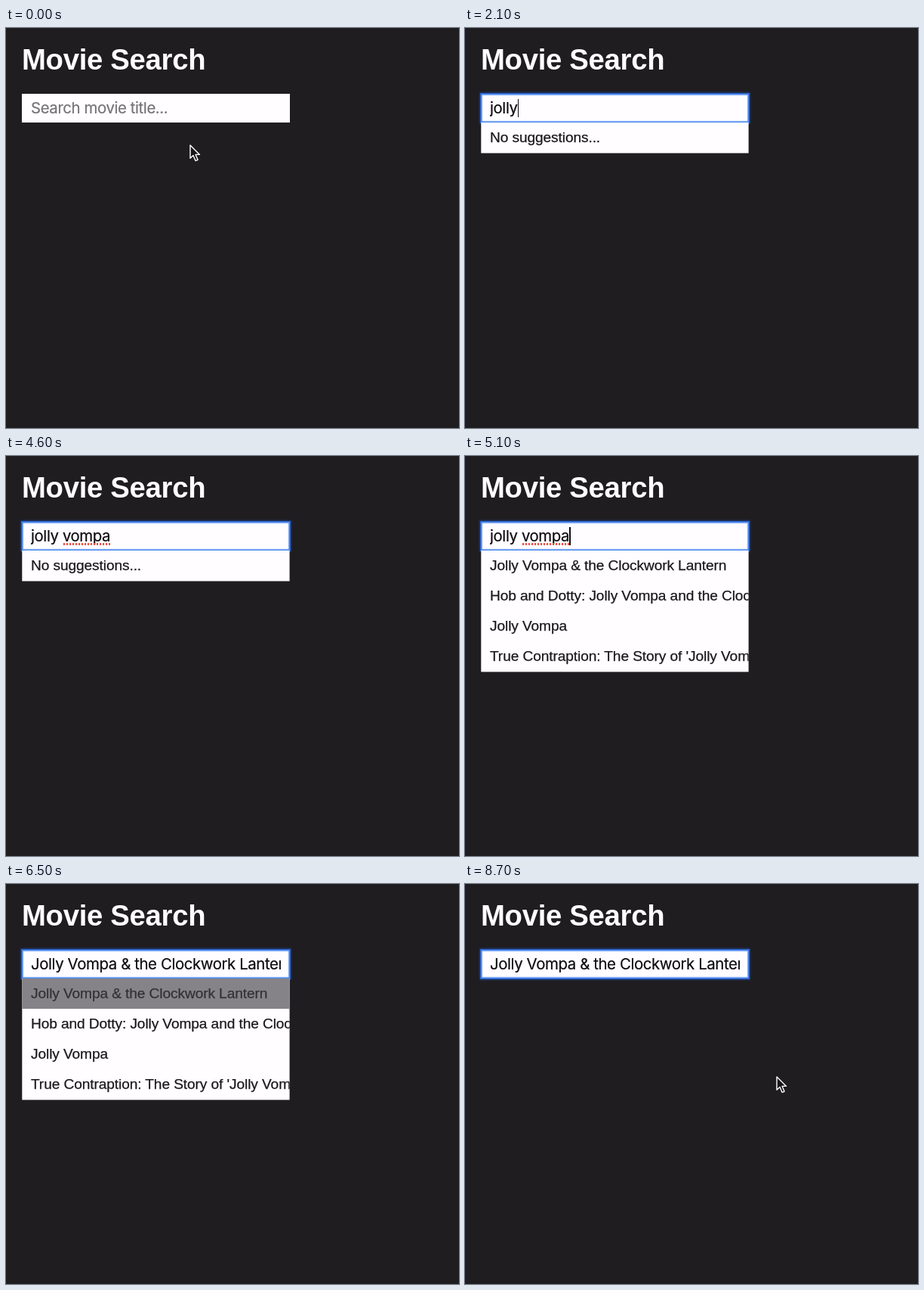
An HTML page for the animation above (8.8 s loop, 600x529 px).

```html
<!DOCTYPE html>
<html lang="en">
<head>
<meta charset="utf-8">
<title>Movie Search</title>
<style>
  html, body { margin: 0; width: 100%; height: 100%; overflow: hidden; background: #1f1d20; }
  #stage { position: relative; width: 600px; height: 529px; overflow: hidden; background: #1f1d20;
    font-family: "Liberation Sans", Arial, sans-serif; }
  h1 { position: absolute; left: 21px; top: 20px; margin: 0; color: #fffdff;
    font-size: 38.3px; line-height: 44px; letter-spacing: -.3px; white-space: nowrap; }
  #field { position: absolute; left: 21px; top: 87px; width: 355px; height: 37.5px; background: #fffdff; }
  #field.focus { box-shadow: 0 0 0 1px #2a5fc4, 0 0 2px 2px rgba(31, 80, 180, .55),
    inset 0 0 0 1.5px #4a88ee, inset 0 0 2px 2px rgba(130, 175, 248, .6); }
  #clip { position: absolute; left: 12px; top: 0; width: 331px; height: 38px; overflow: hidden;
    font: 20.4px/38px Inter, sans-serif; letter-spacing: -.02em; white-space: pre; color: #0c0b0d;
    -webkit-text-stroke: .2px; }
  #hint { position: absolute; left: 0; top: 0; color: #757376; }
  #second { position: relative; display: inline-block; }
  #second.wrong::after { content: ""; position: absolute; left: 0; right: 0; top: 28px; height: 3px;
    background: radial-gradient(circle, #e8503f 1.1px, transparent 1.6px) 0 0 / 4px 3px; }
  #caret { display: inline-block; width: 1.4px; height: 24px; margin-right: -1.4px;
    vertical-align: -5px; background: #0c0b0d; }
  #list { position: absolute; left: 21px; top: 125px; width: 355px; padding-bottom: 1px; overflow: hidden;
    background: #fffdff; clip-path: inset(0 .4px .5px .3px); }
  #list div { height: 40px; padding-left: 12px; color: #1a181b; -webkit-text-stroke: .25px;
    font-size: 19.14px; line-height: 40px; letter-spacing: -.1px; white-space: nowrap; }
  #list .picked { background: #858387; color: #333135; }
  svg { position: absolute; left: 0; top: 0; overflow: visible; }
</style>
</head>
<body>
<div id="stage">
  <h1>Movie Search</h1>
  <div id="field"><div id="clip"><span id="hint">Search movie title...</span><span id="first"></span><span id="second"></span><span id="caret"></span></div></div>
  <div id="list"></div>
  <svg width="1" height="1">
    <path id="arrow" d="M0 0V17.2L4 13.5L7 20.6L10 19.3L7.1 12.4H12.5Z"
      fill="#171517" stroke="#fff" stroke-width="1.4" stroke-linejoin="round"/>
    <g id="beam" fill="none" stroke-linecap="round">
      <path d="M-3.5-10Q0-10 0-7.5Q0-10 3.5-10M0-7.5V7.5M-3.5 10Q0 10 0 7.5Q0 10 3.5 10" stroke="#fff" stroke-width="3"/>
      <path d="M-3.5-10Q0-10 0-7.5Q0-10 3.5-10M0-7.5V7.5M-3.5 10Q0 10 0 7.5Q0 10 3.5 10" stroke="#171517" stroke-width="1.2"/>
    </g>
  </svg>
</div>
<script>
const LOOP = 8800, FOCUS = 400, FOUND = 5100, PICK = 6500, CLOSE = 7600, MISSPELT = 4100;
const QUERY = "jolly vompa";
const TITLES = [
  "Jolly Vompa & the Clockwork Lantern",
  "Hob and Dotty: Jolly Vompa and the Clockwork Lantern",
  "Jolly Vompa",
  "True Contraption: The Story of 'Jolly Vompa'"
];
const KEYS = [1200, 1500, 1700, 1800, 2100, 2300, 2500, 2600, 2700, 2900, 3100];
// time, pointer shape, x, y
const POINTER = [
  [0, "arrow", 244, 155], [100, "arrow", 230, 135], [200, "beam", 207, 110],
  [300, "beam", 202, 106], [1300, "none", 0, 0],
  [8300, "beam", 202, 106], [8400, "arrow", 246, 142], [8500, "arrow", 340, 208],
  [8600, "arrow", 398, 246], [8700, "arrow", 413, 255]
];

const $ = id => document.getElementById(id);
const show = (el, on) => { el.style.display = on ? "" : "none"; };
const setText = (el, text) => { if (el.textContent !== text) el.textContent = text; };

const rows = TITLES.map(() => $("list").appendChild(document.createElement("div")));

function drawField(t) {
  const typed = KEYS.filter(k => k <= t).length;
  const picked = t >= PICK;
  const text = picked ? TITLES[0] : QUERY.slice(0, typed);
  const split = picked ? text.length : 6;
  setText($("first"), text.slice(0, split));
  setText($("second"), text.slice(split));
  $("second").className = t >= MISSPELT && !picked ? "wrong" : "";
  $("field").className = t >= FOCUS ? "focus" : "";
  show($("hint"), !typed);

  const lastKey = typed ? KEYS[typed - 1] : FOCUS;
  const lit = Math.floor((t - lastKey) / 500) % 2 === 0;
  show($("caret"), t >= FOCUS && !picked && lit);
}

function drawList(t) {
  const lines = t >= FOUND ? TITLES : ["No suggestions..."];
  rows.forEach((row, i) => {
    show(row, i < lines.length);
    setText(row, lines[i] || "");
  });
  rows[0].className = t >= PICK ? "picked" : "";
  show($("list"), t >= FOCUS && t < CLOSE);
}

function drawPointer(t) {
  const [, shape, x, y] = POINTER.filter(p => p[0] <= t).pop();
  for (const id of ["arrow", "beam"]) {
    show($(id), id === shape);
    $(id).setAttribute("transform", `translate(${x} ${y})`);
  }
}

function frame() {
  const t = performance.now() % LOOP;
  drawField(t);
  drawList(t);
  drawPointer(t);
  requestAnimationFrame(frame);
}
frame();
</script>
</body>
</html>
```
